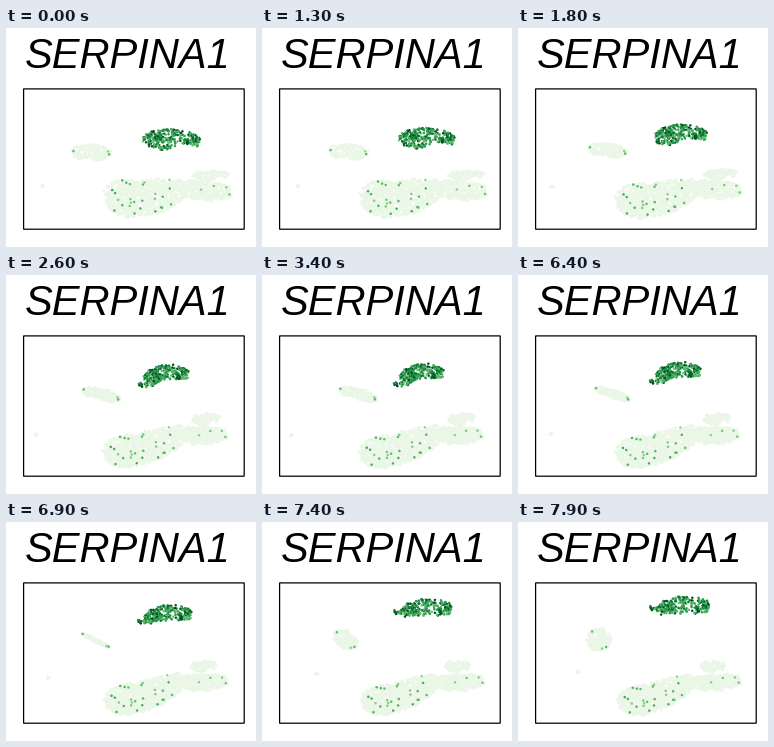
Recreate the animation shown at these times as a matplotlib script. Size 250x219 px, loop 8000 ms.

```python
import numpy as np
import matplotlib.pyplot as plt
from matplotlib.animation import FuncAnimation
from matplotlib.patches import Rectangle

W, H, DPI = 250, 219, 100
FRAMES, STEP, MORPH = 80, 100, 30
rng = np.random.default_rng(11)
greens = plt.get_cmap("Greens")


class Strip:
    """A rounded band of cells; each pose is (x0, y0, x1, y1, half width)."""

    def __init__(self, *poses, bend=0, taper=0):
        self.poses, self.bend, self.taper = poses, bend, taper

    def profile(self, u):
        side = 2 * u - 1
        return np.sqrt(1 - np.abs(side) ** 3) * (1 + self.taper * side)

    def fill(self, count, jitter=0.6):
        """Place the same random cells in every pose."""
        grid = np.linspace(0, 1, 400)
        weight = self.profile(grid)
        u = rng.choice(grid, count, p=weight / weight.sum())
        v = rng.uniform(-1, 1, count) * self.profile(u)
        arch = 4 * u * (1 - u) * self.bend
        poses = []
        for x0, y0, x1, y1, half in self.poses:
            dx, dy = x1 - x0, y1 - y0
            off = (v * half + arch) / np.hypot(dx, dy)
            poses.append(np.stack([x0 + u * dx - off * dy, y0 + u * dy + off * dx], axis=1))
        return np.array(poses) + rng.normal(0, jitter, (len(poses), count, 2))


main = Strip((98, 169, 182, 160, 18), (97, 180, 183, 155, 15.5), (100, 182, 177, 156, 14),
             bend=5, taper=-0.2)
right = Strip((171, 160, 227, 165, 9.5), (171, 161, 222, 160, 8.5), (170, 162, 224, 159, 7.5))
lobe = Strip((186, 148, 222, 147, 4.5), (186, 146, 212, 143, 5.5), (182, 145, 206, 145, 5))
# The negative width turns this cluster over on its way to the last pose.
left = Strip((66, 124, 105, 125, 7.5), (77, 114, 115, 124, 5), (75, 108, 86, 127, -12))
speck = Strip((34, 158, 38, 158, 1), (27, 160, 31, 160, 1), (58, 150, 62, 150, 1))
crown = Strip((134, 111, 195, 114, 6.5), (136, 103, 182, 98, 7), (136, 88, 193, 85, 8),
              bend=-4, taper=0.15)
arm = Strip((141, 115, 169, 118, 2), (131, 109, 157, 101, 2.5), (131, 84, 155, 84, 1.5), bend=3)


def ease(t):
    t = min(max(t, 0), 1)
    return 4 * t ** 3 if t < 0.5 else 1 - 4 * (1 - t) ** 3


pale = [main.fill(800), right.fill(300), lobe.fill(110), left.fill(170), speck.fill(4, 0.2)]
dots = [main.fill(26, 0), right.fill(4, 0), left.fill(3, 0)]
dark = [crown.fill(240), arm.fill(45)]
cells = np.concatenate(pale + dots + dark, axis=1)
n_pale, n_dots, n_dark = (sum(c.shape[1] for c in group) for group in (pale, dots, dark))
level = np.concatenate([np.full(n_pale, 0.09), rng.uniform(0.42, 0.65, n_dots),
                        rng.uniform(0.45, 1, n_dark)])
size = np.repeat([4.4, 3.2, 3.2], [n_pale, n_dots, n_dark])

fig = plt.figure(figsize=(W / DPI, H / DPI), dpi=DPI, facecolor="white")
ax = fig.add_axes([0, 0, 1, 1])
ax.set(xlim=(0, W), ylim=(H, 0))
ax.axis("off")
ax.text(121.5, 40.4, "SERPINA1", family="Liberation Sans", style="italic",
        size=30, ha="center", va="baseline")
ax.add_patch(Rectangle((17.6, 60.9), 220.6, 140.3, fill=False, ec="black", lw=0.9, snap=False))
scatter = ax.scatter(*cells[0].T, s=size, c=greens(level), linewidths=0)


def draw(i):
    first, second = ease((i - 4) / MORPH), ease((i - 55) / MORPH)
    scatter.set_offsets(cells[0] + first * (cells[1] - cells[0])
                        + second * (cells[2] - cells[1]))
    return (scatter,)


anim = FuncAnimation(fig, draw, frames=FRAMES, interval=STEP, repeat=True, repeat_delay=0)
plt.show()
```
